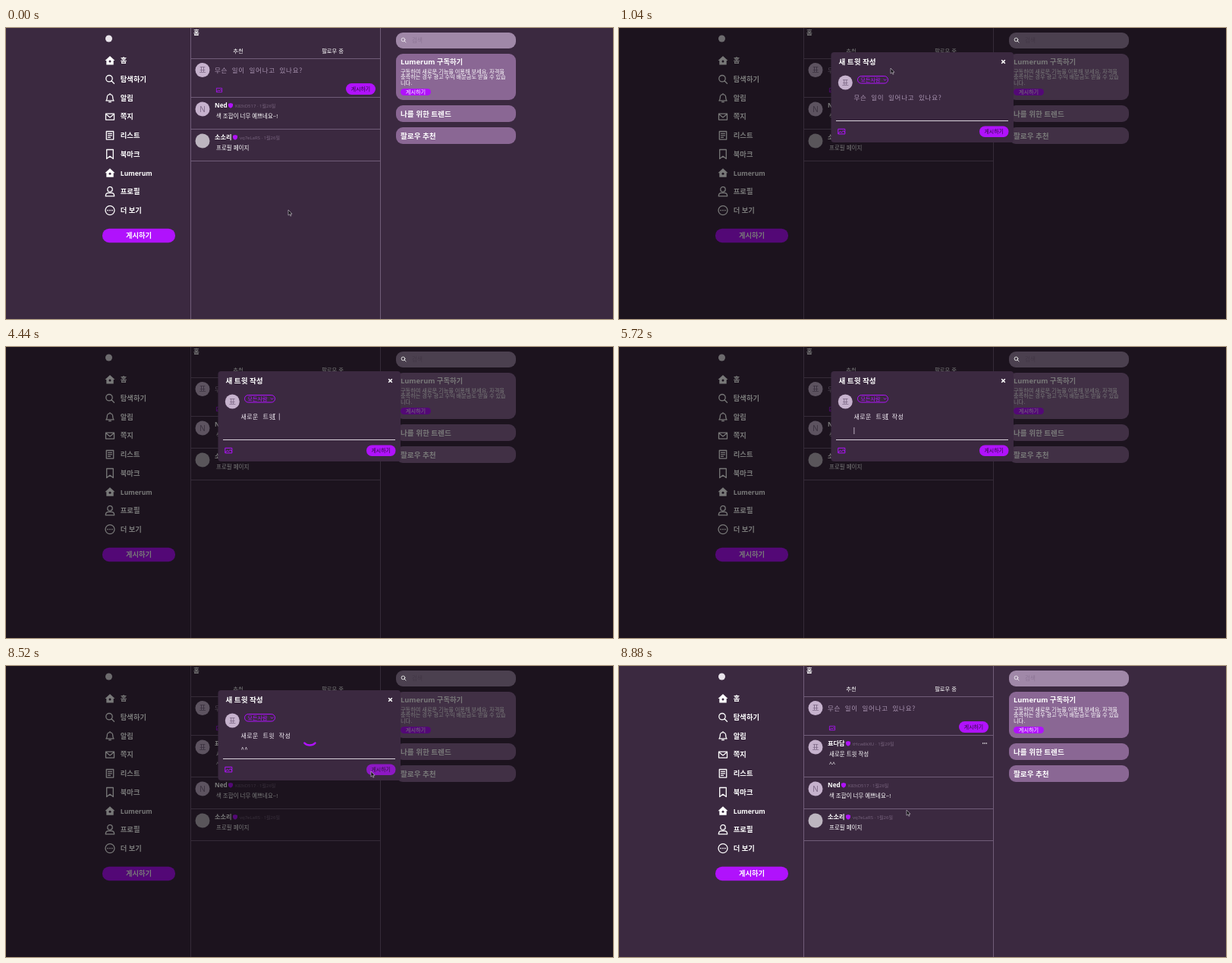
An HTML page for the animation above (8920 ms loop, 800 by 384 pixels).

```html
<!DOCTYPE html>
<html lang="ko">
<head>
<meta charset="utf-8">
<style>
  html, body { margin: 0; height: 100%; overflow: hidden; background: #3b2940; }
  svg { display: block; width: 100vw; height: 100vh; }
  text { font-family: "Open Sans", "Noto Sans CJK KR", "Noto Sans CJK JP", sans-serif; white-space: pre; }
  .hint, .typed { font-family: "Noto Sans CJK KR", "Noto Sans CJK JP", sans-serif; }
  .hint { letter-spacing: .8px; word-spacing: 2.3px; }
  .typed { letter-spacing: .35px; word-spacing: 3.3px; }
  .line { fill: none; stroke: #fff; stroke-width: 1.3; stroke-linejoin: round; stroke-linecap: round; }
</style>
</head>
<body>
<svg id="stage" viewBox="0 0 800 384"></svg>
<script>
const LOOP = 8920, STEP = 40;
const PURPLE = '#b012fc', BG = '#3b2940', RULE = '#705c78', CARD = '#8a6794', LILAC = '#c6b2cd';

const text = (x, y, str, size, fill = '#fff', weight = 400, extra = '') =>
  `<text x="${x}" y="${y}" font-size="${size}" fill="${fill}" font-weight="${weight}" ${extra}>${str}</text>`;
const mid = (x, y, str, size, fill, weight) => text(x, y, str, size, fill, weight, 'text-anchor="middle"');
const box = (x, y, w, h, r, fill, extra = '') =>
  `<rect x="${x}" y="${y}" width="${w}" height="${h}" rx="${r}" fill="${fill}" ${extra}/>`;
const dot = (x, y, r, fill) => `<circle cx="${x}" cy="${y}" r="${r}" fill="${fill}"/>`;
const path = (d, attrs = 'class="line"') => `<path d="${d}" ${attrs}/>`;
const at = (x, y, body) => `<g transform="translate(${x} ${y})">${body}</g>`;
const avatar = (x, y, letter) => dot(x, y, 9.5, LILAC) + mid(x, y + 3.7, letter, 10, '#7a6583');
const hint = (x, y) => text(x, y, '무슨 일이 일어나고 있나요?', 8.5, '#a994b1', 400, 'class="hint"');
const picture = s => path('M-4.5-3.3H4.5V3.3H-4.5ZM-4.5 2.5L-1.5 0L0 1.3L2.5-1L4.5 1.5M-2-1.5h.1',
  `fill="none" stroke="${PURPLE}" transform="scale(${s})"`);

const home = path('M0-6L6.5 0H4.7V5.5H-4.7V0H-6.5Z', 'fill="#fff"') + dot(0, 1, 1.5, BG);
const search = '<circle cx="-1" cy="-1" r="4.2" class="line"/>' + path('M2 2L5.5 5.5');
const menu = [
  ['홈', home],
  ['탐색하기', search],
  ['알림', path('M-5 3.5Q-3.7 2-3.7-1A3.7 3.7 0 0 1 3.7-1Q3.7 2 5 3.5ZM-1.3 5.3H1.3M0-5.8V-5')],
  ['쪽지', path('M-5.5-4H5.5V4H-5.5ZM-5.5-3.5L0 .8L5.5-3.5')],
  ['리스트', path('M-4.7-5.3H4.7V5.3H-4.7ZM-2.5-2.5H2.5M-2.5 0H2.5M-2.5 2.5H.5')],
  ['북마크', path('M-4.3-6H4.3V6L0 2.7L-4.3 6Z')],
  ['Lumerum', home],
  ['프로필', '<circle cy="-3" r="3.2" class="line"/>' + path('M-5.7 6Q-5.7 1.7-2 1.7H2Q5.7 1.7 5.7 6Z')],
  ['더 보기', '<circle r="6" class="line"/>' + [-2.8, 0, 2.8].map(x => dot(x, 0, .9, '#fff')).join('')],
];

const sidebar = dot(135.5, 14, 4.5, '#e9e4eb') +
  menu.map(([label, icon], i) =>
    at(137, 43 + i * 24.7, icon + text(13.8, 3.3, label, i == 6 ? 8.6 : 9.3, '#fff', 700))).join('') +
  box(127, 264.7, 96, 18.5, 9, PURPLE) + mid(175, 277.3, '게시하기', 9.3, '#fff', 700);

// y is the top edge of the post
function post(y, h, face, name, tagX, handle, date, lines) {
  const shield = path('M0-3.3L3-2.2V.4Q2.6 2.6 0 3.5Q-2.6 2.6-3 .4V-2.2Z', `fill="${PURPLE}"`);
  return at(0, y,
    (face ? avatar(259, 16, face) : dot(259, 16, 9.5, '#bdb6c0')) +
    text(275, 14.3, name, 8.2, '#fff', 700) + at(tagX - 6, 11.3, shield) +
    text(tagX, 13.6, `${handle} · ${date}`, 6, '#79657f') +
    lines.map((s, i) => text(277, 27.6 + i * 13, s, 7.5)).join('') +
    box(243, h, 250, 1, 0, RULE));
}

const feed = box(243, 0, 1, 384, 0, RULE) + box(493, 0, 1, 384, 0, RULE) +
  text(247, 9.2, '홈', 8.5, '#fff', 700) +
  mid(306, 32.8, '추천', 7.3, '#fff', 500) + mid(430.5, 32.8, '팔로우 중', 7.3, '#fff', 500) +
  box(243, 40, 250, 1, 0, RULE) + avatar(259, 55.5, '표') + hint(275, 58.5) +
  at(281, 82, picture(.8)) +
  box(448, 73, 39, 15, 7.5, PURPLE) + mid(467.5, 83, '게시하기', 6.9, '#2b0b3a', 500) +
  box(243, 91, 250, 1, 0, RULE) +
  `<g id="fresh">${post(91, 55, '표', '표다담', 308, 'tHcw8kXU', '1월29일', ['새로운 트윗 작성', '^^'])}
   ${[479.7, 482, 484.3].map(x => dot(x, 102, .8, '#fff')).join('')}</g>
   <g id="older">${post(91, 42, 'N', 'Ned', 302, 'K83tD517', '1월26일', ['색 조합이 너무 예쁘네요~!'])}
   ${post(133, 42, '', '소소리', 308, 'vq7eLaRS', '1월26일', ['프로필 페이지'])}</g>`;

const aside = box(514, 6, 158, 21, 9, '#a088a8') + text(535, 19, '검색', 7.5, '#8c7595') +
  box(514, 34, 158, 61, 9, CARD) + text(520, 48.3, 'Lumerum 구독하기', 9.3, '#fff', 700) +
  ['구독하여 새로운 기능을 이용해 보세요. 자격을', '충족하는 경우 광고 수익 배분금도 받을 수 있습', '니다.']
    .map((s, i) => text(520, 59.5 + i * 7.8, s, 7.2, '#fff', 500)).join('') +
  box(520, 80, 40, 9, 4.5, PURPLE) + mid(540, 87.2, '게시하기', 7.2, '#fff', 500) +
  box(514, 102, 158, 22, 9, CARD) + text(520, 116.5, '나를 위한 트렌드', 9.6, '#fff', 700) +
  box(514, 131, 158, 22, 9, CARD) + text(520, 145.5, '팔로우 추천', 9.6, '#fff', 700);

const searchIcon = at(524, 16, `<g transform="scale(.55)">${search}</g>`);

const modal = `<g id="modal">${box(0, 0, 800, 384, 0, '#000', 'opacity=".53"')}
  ${searchIcon}
  ${box(279.5, 32, 240.5, 119, 4, BG)}
  ${text(289.5, 48, '새 트윗 작성', 9.6, '#fff', 700)}
  ${path('M504.2 42.2L508.8 46.8M508.8 42.2L504.2 46.8', 'stroke="#fff" stroke-width="1.6"')}
  ${avatar(298.3, 72, '표')}
  ${box(314.5, 63.5, 40, 9.5, 4.7, 'none', `stroke="${PURPLE}"`)}
  ${text(318.5, 70.8, '모든사람', 7.1, PURPLE)}
  ${path('M348.7 67.4L350.5 69.2L352.3 67.4', `fill="none" stroke="${PURPLE}"`)}
  <g id="hint">${hint(309.5, 95)}</g>
  <text id="typed" class="typed" x="309.5" y="95" font-size="8" fill="#f4eef6"><tspan id="done"></tspan><tspan id="composing" text-decoration="underline"></tspan></text>
  <text id="second" class="typed" x="309.5" y="113" font-size="8" fill="#f4eef6"></text>
  <rect id="caret" width=".8" height="9" fill="#d8ccdd"/>
  ${box(286, 122, 227, 1, 0, '#d9d2dc')}
  ${at(293.3, 136.6, picture(1))}
  <g id="send">${box(475, 129.5, 38.5, 14.5, 7.2, PURPLE)}${mid(494.2, 139.3, '게시하기', 6.9, '#2b0b3a', 500)}</g>
  <g id="spinner">${path('M-7.1-7.1A10 10 0 0 1 7.1-7.1', `fill="none" stroke="${PURPLE}" stroke-width="2.4" stroke-linecap="round"`)}</g>
</g>`;

const pointer = `<g id="pointer">
  ${path('M0 0V7.2L1.7 5.7L2.9 8.2L4 7.7L2.9 5.3H5Z', 'id="arrow" fill="#121014" stroke="#d6cfd9" stroke-width=".6"')}
  ${path('M-1.5-3.5H1.5M0-3.5V3.5M-1.5 3.5H1.5', 'id="beam" fill="none" stroke="#d6cfd9" stroke-width=".8"')}</g>`;

const stage = document.getElementById('stage');
stage.innerHTML = box(0, 0, 800, 384, 0, BG) + sidebar + feed + aside + searchIcon + modal + pointer;
const el = {};
stage.querySelectorAll('[id]').forEach(e => el[e.id] = e);
const show = (e, on) => e.setAttribute('display', on ? 'inline' : 'none');
const move = (e, x, y, more = '') => e.setAttribute('transform', `translate(${x} ${y}) ${more}`);

// Each keystroke: time, and the line as the input method shows it
const keyTimes = [3240, 3320, 3360, 3440, 3480, 3560, 3600, 3680, 3760, 3800, 4000,
  4160, 4200, 4280, 4440, 4480, 4560, 4640, 4800, 4840, 4920];
const words = ['ㅅ,새,샐,새로,새롱,새로우,새로운,새로운 ', 'ㅌ,트,틍,트우,트위,트윗,트윗 ', 'ㅈ,자,작,잓,작서,작성'];
const keys = words.flatMap((w, i) =>
  w.split(',').map(s => ['', '새로운 ', '새로운 트윗 '][i] + s));

const moves = [[400, 680, 358, 53], [2040, 2400, 353.5, 92], [7400, 7960, 481, 139], [8600, 8880, 379, 190]];
const ease = p => p < .5 ? 4 * p ** 3 : 1 - 4 * (1 - p) ** 3;
const caretOn = [[2600, 3000], [3240, 5480], [5600, 6280], [6520, 7200]];

function pointerAt(t) {
  let x = 372, y = 240;
  for (const [from, to, tx, ty] of moves) {
    if (t < from) break;
    const p = ease(Math.min(1, (t - from) / (to - from)));
    x += (tx - x) * p;
    y += (ty - y) * p;
  }
  return [x, y];
}

function draw(t) {
  const open = t >= 1040 && t < 8640, posted = t >= 8240, busy = t >= 8000;
  show(el.modal, open);
  show(el.fresh, posted);
  move(el.older, 0, posted ? 55 : 0);

  const line = keys[keyTimes.filter(k => k <= t).length - 1] || '';
  const pending = t < 5600 && !line.endsWith(' ') ? line.slice(-1) : '';
  el.done.textContent = line.slice(0, line.length - pending.length);
  el.composing.textContent = pending;
  el.second.textContent = t >= 6680 ? '^^' : t >= 6520 ? '^' : '';
  show(el.hint, !line);

  const below = t >= 5720;
  show(el.caret, caretOn.some(([a, b]) => t >= a && t < b));
  if (open) move(el.caret, 309.5 + (below ? el.second : el.typed).getComputedTextLength(), below ? 106 : 87.5);

  el.send.setAttribute('opacity', busy ? .7 : 1);
  show(el.spinner, busy);
  move(el.spinner, 400.4, 94.5, `rotate(${(t - 8020) * .36})`);

  const [x, y] = pointerAt(t), overText = open && y > 82 && y < 120;
  move(el.pointer, x, y);
  show(el.arrow, !overText);
  show(el.beam, overText);
}

(function tick() {
  draw(Math.floor(performance.now() % LOOP / STEP) * STEP);
  requestAnimationFrame(tick);
})();
</script>
</body>
</html>
```
